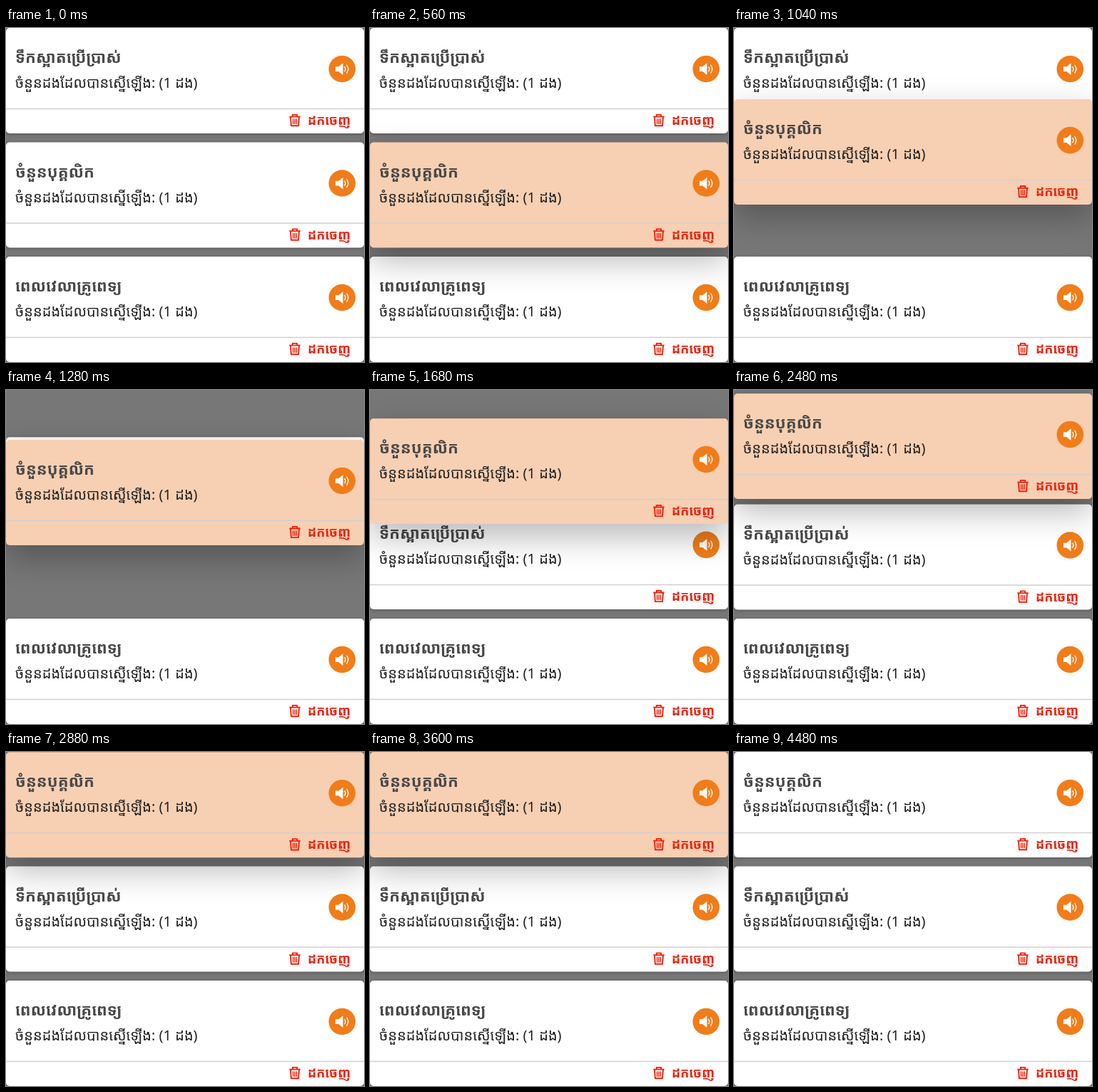
Write an HTML page that moves like this. It is 502 px wide and 469 px high and loops after 4.56 s.

```html
<!DOCTYPE html>
<html lang="km">
<head>
<meta charset="utf-8">
<title>Reorder cards</title>
<style>
  html, body { margin: 0; width: 100%; height: 100%; overflow: hidden; }
  #stage { position: relative; width: 502px; height: 469px; overflow: hidden; background: #777; }
  .card {
    position: absolute; left: 0; top: 0; width: 502px; height: 148px;
    border-radius: 5px; background: #fff; box-shadow: 0 1px 4px rgba(0,0,0,.3);
  }
  .card svg { position: absolute; left: 0; top: 0; overflow: visible; }
  text { font-family: "Noto Sans", "Noto Sans Khmer", "Noto Sans Khmer UI", "Open Sans", sans-serif; }
  .title { font-size: 22px; font-weight: 700; fill: #484848; }
  .count { font-size: 20px; fill: #222; }
  .remove { font-size: 18px; font-weight: 700; fill: #f0200c; }
</style>
</head>
<body>
<div id="stage"></div>
<script>
const LOOP = 4560, GAP = 160.5;
const stage = document.getElementById('stage');

function addCard(title, y, z) {
  const card = document.createElement('div');
  card.className = 'card';
  card.style.transform = `translateY(${y}px)`;
  card.style.zIndex = z;
  card.innerHTML = `<svg width="502" height="148">
    <text class="title" x="13" y="49">${title}</text>
    <text class="count" x="13" y="84">ចំនួនដងដែលបានស្នើឡើង: (1 ដង)</text>
    <path d="M0 113.5H502" stroke="#d0d0d0" stroke-width="1.5"/>
    <circle cx="471.3" cy="57.5" r="18.8" fill="#f07d1a"/>
    <path d="M462 54.2h4.3l6.2-5v16.8l-6.2-5H462z" fill="#fff"/>
    <path d="M475 54.6q2 3 0 6M477.9 52.2q3.8 5.4 0 10.8" fill="none" stroke="#fff" stroke-width="1.4" stroke-linecap="round"/>
    <g fill="none" stroke="#f0200c" stroke-width="1.9" stroke-linejoin="round">
      <path d="M397.3 124.6h15.4M401.8 124.2v-2.3h6.4v2.3M399 125l.9 12.2h10.2l.9-12.2"/>
      <path d="M402.6 127.5v7.5M405 127.5v7.5M407.4 127.5v7.5" stroke-width="1.4"/>
    </g>
    <text class="remove" x="423" y="136">ដកចេញ</text>
  </svg>`;
  stage.append(card);
  return card;
}

// Steps are [time in ms, value, easing to the next step].
function play(el, prop, steps, format = v => v) {
  const frames = steps.map(([t, v, easing = 'linear']) =>
    ({ offset: t / LOOP, [prop]: format(v), easing }));
  el.animate(frames, { duration: LOOP, iterations: Infinity }).startTime = 0;
}

const shiftY = y => `translateY(${y}px)`;
const water = addCard('ទឹកស្អាតប្រើប្រាស់', 0, 1);
const staff = addCard('ចំនួនបុគ្គលិក', GAP, 2);
addCard('ពេលវេលាគ្រូពេទ្យ', 2 * GAP, 1);

play(water, 'transform', [
  [0, 0], [1130, 0, 'ease'], [1730, GAP], [LOOP, GAP]
], shiftY);

play(staff, 'transform', [
  [0, GAP], [640, GAP], [800, 140], [1120, 87], [1280, 70], [1680, 40],
  [2080, 19], [2480, 5], [2900, 0], [LOOP, 0]
], shiftY);

const lift = [[0, 0], [160, 0], [360, 1], [3680, 1], [3920, 0], [LOOP, 0]];
play(staff, 'backgroundColor', lift, v => v ? '#f7cfb2' : '#fff');
play(staff, 'boxShadow', lift, v => v
  ? '0 18px 46px rgba(0,0,0,.28)'
  : '0 1px 4px rgba(0,0,0,.3)');
</script>
</body>
</html>
```
